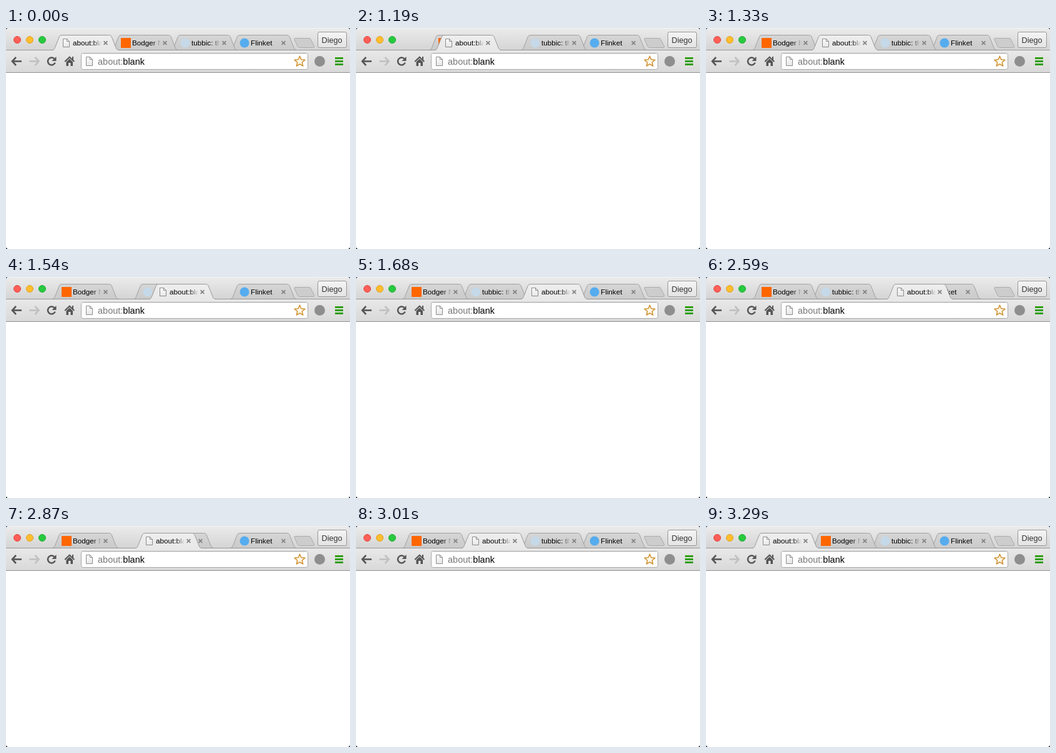
Recreate the animation shown at these times as an HTML page with a canvas. Size 551x355 px, loop 3.99 s.

```html
<!DOCTYPE html>
<html lang="en">
<head>
<meta charset="utf-8">
<title>Moving tabs</title>
<style>
html, body { margin: 0; width: 100%; height: 100%; overflow: hidden; background: #fff; }
canvas { display: block; width: 551px; height: 355px; }
</style>
</head>
<body>
<canvas id="stage" width="551" height="355"></canvas>
<script>
const W = 551, H = 355, LOOP = 3990;
const PITCH = 95, TICK = 70, SLIDE = 150;
const FONT = '"Liberation Sans", Arial, sans-serif';
const c = document.getElementById('stage').getContext('2d');

// start time, direction, time already spent sliding at the first tick
const moves = [
  [1190, 1, 49], [1540, 1, 59], [1820, 1, 55],
  [2590, -1, 73], [2870, -1, 55], [3150, -1, 55]
];

const others = [
  { title: 'Bodger News', icon: x => box(x, 16, 16, 16, '#ff6600') },
  { title: 'tubbic: the', icon: x => disc(x + 8, 24, 7.5, '#c5d9e9') },
  { title: 'Flinket', icon: x => disc(x + 8, 24, 7.5, '#55acee') }
];
const blank = { title: 'about:blank', icon: x => page(x + 2.5, 17.5, 10, 13) };

const clamp = v => Math.max(0, Math.min(1, v));

function box(x, y, w, h, fill) {
  c.fillStyle = fill;
  c.fillRect(x, y, w, h);
}

function disc(x, y, r, fill, edge) {
  c.beginPath();
  c.arc(x, y, r, 0, Math.PI * 2);
  c.fillStyle = fill;
  c.fill();
  if (edge) stroke(edge, 1);
}

function stroke(color, width) {
  c.strokeStyle = color;
  c.lineWidth = width;
  c.stroke();
}

function poly(points, close) {
  c.beginPath();
  points.forEach(([x, y]) => c.lineTo(x, y));
  if (close) c.closePath();
}

function shade(y0, y1, top, bottom) {
  const g = c.createLinearGradient(0, y0, 0, y1);
  g.addColorStop(0, top);
  g.addColorStop(1, bottom);
  return g;
}

function text(str, x, y, size, fill) {
  c.font = size + 'px ' + FONT;
  c.fillStyle = fill;
  c.fillText(str, x, y);
}

function page(x, y, w, h) {
  const fold = 4;
  poly([[x, y], [x + w - fold, y], [x + w, y + fold], [x + w, y + h], [x, y + h]], true);
  c.fillStyle = shade(y, y + h, '#fdfdfd', '#e6e6e6');
  c.fill();
  stroke('#8b8b8b', 1);
  poly([[x + w - fold, y], [x + w - fold, y + fold], [x + w, y + fold]]);
  stroke('#8b8b8b', 1);
}

function tabPath(x) {
  c.beginPath();
  c.moveTo(x, 35.5);
  c.bezierCurveTo(x + 3, 35.3, x + 4, 34, x + 5, 31.5);
  c.lineTo(x + 11.5, 15);
  c.bezierCurveTo(x + 12.7, 12.3, x + 13.5, 11.5, x + 16.5, 11.5);
  c.lineTo(x + 91, 11.5);
  c.bezierCurveTo(x + 94, 11.5, x + 94.8, 12.3, x + 96, 15);
  c.lineTo(x + 102.5, 31.5);
  c.bezierCurveTo(x + 103.5, 34, x + 104.5, 35.3, x + 107.5, 35.5);
}

function drawTab(tab, pos, active) {
  const x = Math.round(pos * PITCH);
  tabPath(x + 73.5);
  c.fillStyle = active ? shade(11, 36, '#eeeeee', '#e8e8e8') : shade(11, 36, '#d6d6d6', '#cacaca');
  c.fill();
  stroke(active ? '#989898' : '#a0a0a0', 1);
  if (active) box(x + 76, 35, 103, 1.5, '#e8e8e8');
  tab.icon(x + 89);
  drawTitle(tab.title, x + 107);
  const cx = x + 159.5, r = 2.9;
  poly([[cx - r, 24 - r], [cx + r, 24 + r]]);
  stroke('#848484', 1.8);
  poly([[cx - r, 24 + r], [cx + r, 24 - r]]);
  stroke('#848484', 1.8);
}

function drawTitle(str, x) {
  c.save();
  c.beginPath();
  c.rect(x - 1, 13, 47, 21);
  c.clip();
  const fade = c.createLinearGradient(x + 32, 0, x + 46, 0);
  fade.addColorStop(0, '#000');
  fade.addColorStop(1, 'rgba(0,0,0,0)');
  c.font = '11.7px ' + FONT;
  text(str, x, 28, 11.7, c.measureText(str).width > 46 ? fade : '#000');
  c.restore();
}

function drawFrame() {
  box(0, 0, W, 36, shade(0, 36, '#ebebeb', '#d4d4d4'));
  box(0, 0, W, 1, '#f4f4f4');
  [[18, '#ff5f57', '#e2463f'], [38, '#ffbd2e', '#dfa023'], [58, '#28c940', '#1dad2b']]
    .forEach(([x, fill, edge]) => disc(x, 19, 5.5, fill, edge));

  // new tab button
  c.beginPath();
  c.moveTo(464, 16.5);
  c.lineTo(485, 16.5);
  c.quadraticCurveTo(487.5, 16.5, 488.3, 18.5);
  c.lineTo(493.6, 29.5);
  c.quadraticCurveTo(494.5, 31.5, 492, 31.5);
  c.lineTo(470.5, 31.5);
  c.quadraticCurveTo(468, 31.5, 467.2, 29.5);
  c.lineTo(461.9, 18.5);
  c.quadraticCurveTo(461, 16.5, 464, 16.5);
  c.fillStyle = '#cdcdcd';
  c.fill();
  stroke('#aaaaaa', 1);

  // profile button
  c.beginPath();
  c.roundRect(499.5, 6.5, 46, 25, 2.5);
  c.fillStyle = shade(6, 32, '#f5f5f5', '#e3e3e3');
  c.fill();
  stroke('#989898', 1);
  text('Diego', 505.5, 24, 12.7, '#333');
}

function drawArrow(x, dir, color) {
  poly([[x - 7 * dir, 53.5], [x + 8 * dir, 53.5]]);
  stroke(color, 2.6);
  poly([[x - dir, 47], [x - 7 * dir, 53.5], [x - dir, 60]]);
  stroke(color, 2.6);
}

function drawReload() {
  c.beginPath();
  c.arc(73, 53.5, 6, 0.35, Math.PI * 1.75);
  stroke('#555', 2.5);
  poly([[80.5, 46], [80.5, 53], [73.5, 53]], true);
  c.fillStyle = '#555';
  c.fill();
}

function drawHome() {
  poly([[94.3, 54], [101.8, 46.8], [109.3, 54]]);
  stroke('#555', 2.2);
  box(106, 46, 2, 5, '#555');
  poly([[96.5, 54.5], [101.8, 49.5], [107, 54.5], [107, 61], [103.5, 61],
    [103.5, 56], [100, 56], [100, 61], [96.5, 61]], true);
  c.fillStyle = '#555';
  c.fill();
}

function drawStar(x, y) {
  const points = Array.from({ length: 10 }, (_, i) => {
    const a = i * Math.PI / 5 - Math.PI / 2, r = i % 2 ? 4 : 8.8;
    return [x + r * Math.cos(a), y + r * Math.sin(a)];
  });
  poly(points, true);
  c.lineJoin = 'round';
  c.fillStyle = '#fff9e8';
  c.fill();
  stroke('#d09437', 1.6);
  c.lineJoin = 'miter';
}

function drawToolbar() {
  box(0, 36, W, 35, shade(36, 71, '#e8e8e8', '#d9d9d9'));
  box(0, 71, W, 1, '#8e8e8e');
  drawArrow(17, 1, '#555');
  drawArrow(45.5, -1, '#c0c0c0');
  drawReload();
  drawHome();

  c.beginPath();
  c.roundRect(120.5, 40.5, 363, 26, 3);
  c.fillStyle = '#fff';
  c.fill();
  stroke('#a9a9a9', 1);
  box(122, 41, 360, 1, '#e6e6e6');
  page(128.5, 46.5, 10, 14);
  text('about:', 147, 59, 14.5, '#777');
  text('blank', 147 + c.measureText('about:').width, 59, 14.5, '#000');
  drawStar(470.5, 54);
  disc(502.5, 53.5, 8.5, '#8e8e8e');
  for (let i = 0; i < 3; i++) box(527, 47 + i * 5, 13, 3, '#2f9e0b');
}

function drawCorners() {
  const r = 4;
  [[0, 0], [W, 0], [0, H], [W, H]].forEach(([x, y]) => {
    const sx = x ? -1 : 1, sy = y ? -1 : 1;
    c.beginPath();
    c.moveTo(x, y);
    c.lineTo(x + r * sx, y);
    c.quadraticCurveTo(x, y, x, y + r * sy);
    c.fillStyle = y ? '#000' : '#34435c';
    c.fill();
  });
}

function activeSlot(t) {
  return moves.reduce((slot, [start, dir, lead]) => {
    if (t < start) return slot;
    const ticks = Math.floor((t - start) / TICK);
    const u = clamp((lead + ticks * TICK) / SLIDE);
    return slot + dir * (1 - (1 - u) ** 2);
  }, 0);
}

function draw(t) {
  const slot = activeSlot(t);
  box(0, 0, W, H, '#fff');
  drawFrame();
  drawToolbar();
  for (let i = others.length - 1; i >= 0; i--) {
    drawTab(others[i], i + 1 - clamp(slot - i), false);
  }
  box(0, 35, W, 1, '#989898');
  drawTab(blank, slot, true);
  drawCorners();
}

const begin = performance.now();
function loop() {
  draw((performance.now() - begin) % LOOP);
  requestAnimationFrame(loop);
}
loop();
</script>
</body>
</html>
```
